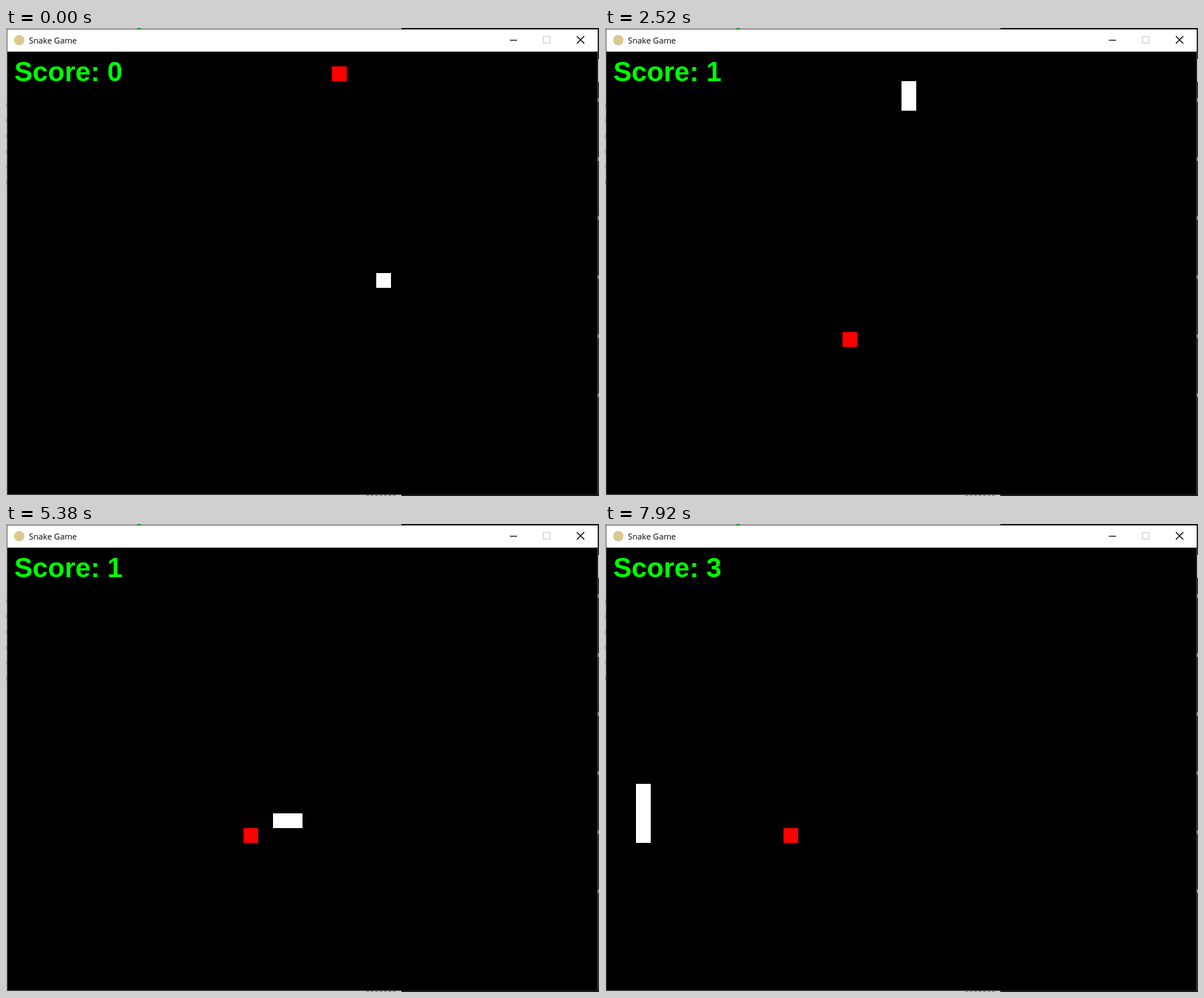
An HTML page with a canvas that plays this animation: 804x634 px, repeating every 8 s.

```html
<!DOCTYPE html>
<html lang="en">
<head>
<meta charset="utf-8">
<title>Snake Game</title>
<style>
html, body { margin: 0; width: 100%; height: 100%; overflow: hidden; background: #000; }
canvas { display: block; }
</style>
</head>
<body>
<canvas id="stage" width="804" height="634"></canvas>
<script>
const ctx = document.getElementById('stage').getContext('2d');
const LOOP = 8000, CELL = 20, LEFT = 2, TOP = 32;

const moves = 'R8 U14 L13 D12 L6 D7 R10 U2 L8 D3 R5 U5 L19 D3';
const foods = [[22, 1], [16, 19], [2, 17], [12, 19]];
const dirs = { R: [1, 0], L: [-1, 0], U: [0, -1], D: [0, 1] };

// The game runs in batches of 12 even steps; these are the batch starts in ms.
const BATCH = 12;
const starts = [20, 860, 1680, 2520, 3340, 4180, 5030, 5870, 6690, 7540, 8300];

// Play the game once: head position and score after every step.
const route = [{ x: 25, y: 15, score: 0 }];
for (const move of moves.split(' ')) {
  const [dx, dy] = dirs[move[0]];
  for (let n = +move.slice(1); n > 0; n--) {
    const last = route[route.length - 1];
    const x = last.x + dx, y = last.y + dy;
    const [fx, fy] = foods[last.score];
    route.push({ x, y, score: last.score + (x === fx && y === fy ? 1 : 0) });
  }
}

function stepAt(t) {
  if (t < starts[0]) return 0;
  const k = starts.findIndex(s => s > t) - 1;
  const part = (t - starts[k]) / (starts[k + 1] - starts[k]);
  const step = 1 + BATCH * k + Math.floor(BATCH * part + 1e-6);
  return Math.min(step, route.length - 1);
}

function rect(color, x, y, w, h) {
  ctx.fillStyle = color;
  ctx.fillRect(x, y, w, h);
}

function cell(color, x, y) {
  rect(color, LEFT + x * CELL, TOP + y * CELL, CELL, CELL);
}

function text(str, x, y, font, color) {
  ctx.font = font;
  ctx.fillStyle = color;
  ctx.fillText(str, x, y);
}

function line(x1, y1, x2, y2, width) {
  ctx.strokeStyle = '#000';
  ctx.lineWidth = width;
  ctx.beginPath();
  ctx.moveTo(x1, y1);
  ctx.lineTo(x2, y2);
  ctx.stroke();
}

// Slivers of the desktop around the window
function drawEdges() {
  rect('#1c1c1c', 0, 0, 804, 634);
  rect('#d4d4d4', 0, 0, 536, 1);
  rect('#5c5c5c', 0, 1, 536, 1);
  rect('#00c000', 178, 0, 5, 1);
  rect('#d0d0d0', 0, 2, 1, 632);
  rect('#6a6a6a', 1, 2, 1, 630);
  for (let y = 102; y < 215; y += 21) rect('#999', 0, y, 1, 5);
  rect('#8a8a8a', 1, 632, 535, 1);
  rect('#d4d4d4', 0, 633, 536, 1);
  for (let x = 489; x < 528; x += 6) rect('#777', x, 633, 3, 1);
  rect('#555', 802, 2, 1, 630);
  rect('#d8d8d8', 803, 42, 1, 31);
  for (let y = 95; y < 500; y += 80) rect('#888', 802, y, 2, 5);
}

function drawTitleBar() {
  rect('#fff', 2, 2, 800, 30);
  ctx.fillStyle = '#d9c98c';
  ctx.beginPath();
  ctx.arc(18, 16.5, 7, 0, Math.PI * 2);
  ctx.fill();
  text('Snake Game', 31, 21, '11.2px "Open Sans", sans-serif', '#000');
  line(683, 16.5, 693, 16.5, 1);
  ctx.strokeStyle = '#ccc';
  ctx.strokeRect(728.5, 11.5, 9, 9);
  line(774, 11, 784, 21, 1.3);
  line(784, 11, 774, 21, 1.3);
}

function draw(t) {
  const step = stepAt(t);
  const { score } = route[step];
  drawEdges();
  drawTitleBar();
  rect('#000', LEFT, TOP, 800, 600);
  for (const { x, y } of route.slice(Math.max(0, step - score), step + 1)) cell('#fff', x, y);
  cell('#f00', ...foods[score]);
  text('Score: ' + score, 11.3, 72, 'bold 37.2px "Liberation Sans", Arial, sans-serif', '#0f0');
}

const start = performance.now();
function tick() {
  draw((performance.now() - start) % LOOP);
  requestAnimationFrame(tick);
}
tick();
</script>
</body>
</html>
```
